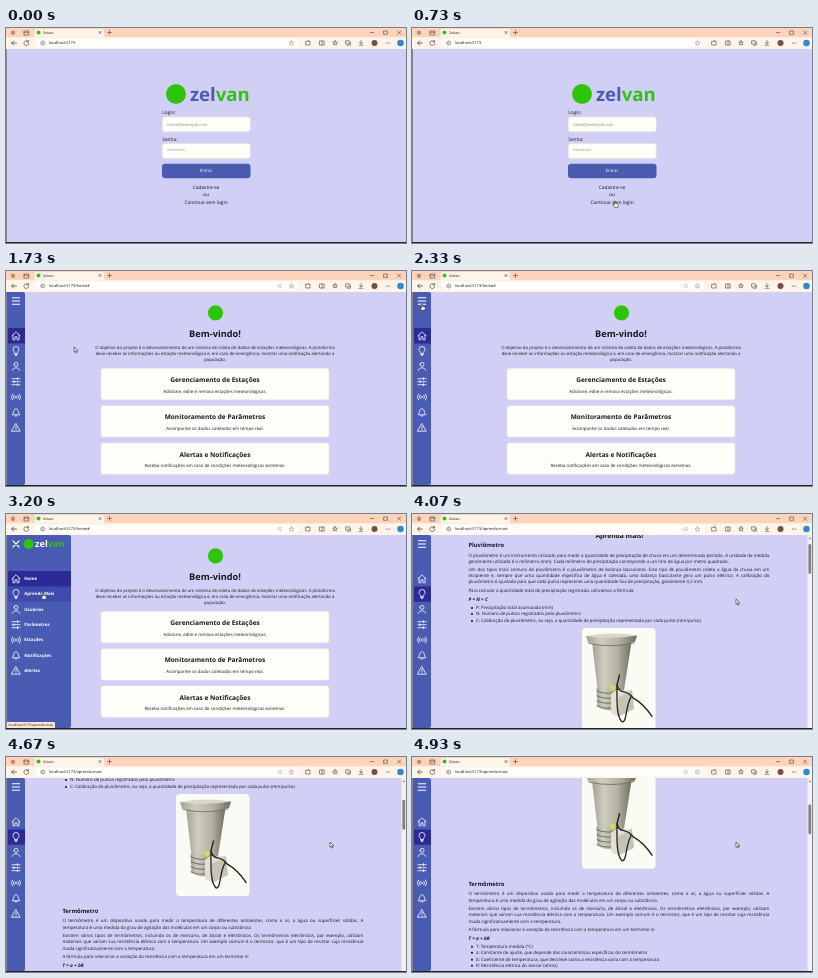
Recreate the animation shown at these times as an HTML page. Size 400x215 px, loop 4990 ms.

```html
<!DOCTYPE html>
<html lang="pt-BR">
<head>
<meta charset="utf-8">
<title>Zelvan</title>
<style>
html, body { margin: 0; width: 100%; height: 100%; overflow: hidden; }
#stage { position: relative; width: 400px; height: 215px; overflow: hidden; background: #d2cff6;
  font-family: "Open Sans", "Noto Sans", sans-serif; text-rendering: geometricPrecision; color: #17171c; }
#stage > *, #scroll, #scroll > * { position: absolute; }
svg { position: absolute; left: 0; top: 0; overflow: visible; }
#learn { inset: 0; }
#scroll { left: 0; top: 0; width: 396px; }
#scroll div { left: 56.4px; width: 301px; height: 6px; line-height: 6px; font-size: 4.45px; white-space: nowrap; }
#scroll .full { text-align-last: justify; }
#scroll .head { font-size: 5.8px; font-weight: 700; }
#scroll .eq { font-size: 4.75px; font-weight: 700; font-style: italic; }
#scroll .item { left: 64px; }
#scroll .item::before { content: ""; position: absolute; left: -5.2px; top: 2.2px; width: 1.8px; height: 1.8px; border-radius: 50%; background: #17171c; }
#scroll .title { left: 19px; width: 377px; text-align: center; font-size: 6.7px; font-weight: 700; }
#side { left: 1px; top: 21px; height: 193px; overflow: hidden; background: #4a5bb4; border-radius: 0 2px 2px 0; }
#side svg { left: -1px; top: -21px; }
</style>
</head>
<body>
<div id="stage">
  <svg id="login" width="400" height="215"></svg>
  <svg id="home" width="400" height="215"></svg>
  <div id="learn"><div id="scroll"></div><svg id="bar" width="400" height="215"></svg></div>
  <div id="side"><svg id="menu" width="400" height="215"></svg></div>
  <svg id="chrome" width="400" height="215"></svg>
  <svg id="cursor" width="20" height="20"></svg>
</div>
<script>
const LOOP = 4990, TICK = 1000 / 15;
const HOME_AT = 870, OPEN_AT = 2450, LEARN_AT = 3450;
const HOST = 'localhost:5173';
const INK = '#17171c', BLUE = '#4a5bb0', GREEN = '#2fc40c';
const $ = id => document.getElementById(id);

// SVG helpers; text is centred vertically on y
const text = (x, y, size, str, attrs = '') =>
  `<text x="${x}" y="${y + size * 0.3}" font-size="${size}" fill="${INK}" ${attrs}>${str}</text>`;
const mid = (x, y, size, str, attrs = '') => text(x, y, size, str, 'text-anchor="middle" ' + attrs);
const rect = (x, y, w, h, fill, r = 0, attrs = '') =>
  `<rect x="${x}" y="${y}" width="${w}" height="${h}" rx="${r}" fill="${fill}" ${attrs}/>`;
const dot = (x, y, r, fill) => `<circle cx="${x}" cy="${y}" r="${r}" fill="${fill}"/>`;
const line = (d, stroke, w = 0.7, attrs = '') =>
  `<path d="${d}" fill="none" stroke="${stroke}" stroke-width="${w}" stroke-linecap="round" stroke-linejoin="round" ${attrs}/>`;
const at = (x, y, body) => `<g transform="translate(${x} ${y})">${body}</g>`;
const BOLD = 'font-weight="700"';

function drawLogin() {
  const field = y => rect(156.3, y, 88, 14.8, '#fefefa', 2.5, 'stroke="#e6e5c4" stroke-width=".6"');
  const hint = 'style="fill:#85858c"';
  $('login').innerHTML =
    dot(170, 66, 10, GREEN) +
    text(184, 67, 18.6, `<tspan fill="${BLUE}">zel</tspan><tspan fill="${GREEN}">van</tspan>`, BOLD) +
    text(156.3, 85, 4.8, 'Login:') + field(89) + text(161, 96.6, 4.1, 'nome@exemplo.com', hint) +
    text(156.3, 112, 4.8, 'Senha:') + field(115.6) + text(161, 123.2, 4.1, '********', hint) +
    rect(156, 135.8, 88.5, 14.4, BLUE, 3) + mid(200, 143, 4.4, 'Entrar', 'style="fill:#fff"') +
    ['Cadastre-se', 'ou', 'Continue sem login'].map((s, i) => mid(200, 159.2 + i * 7.5, 4.8, s)).join('');
}

function drawHome() {
  const intro = [
    'O objetivo do projeto é o desenvolvimento de um sistema de coleta de dados de estações meteorológicas. A plataforma',
    'deve receber as informações ou estação meteorológica e, em caso de emergência, mostrar uma notificação alertando a',
    'população.'];
  const cards = [
    ['Gerenciamento de Estações', 'Adicione, edite e remova estações meteorológicas.'],
    ['Monitoramento de Parâmetros', 'Acompanhe os dados coletados em tempo real.'],
    ['Alertas e Notificações', 'Receba notificações em caso de condições meteorológicas extremas.']];
  $('home').innerHTML =
    dot(209.5, 41.8, 7.6, GREEN) + mid(209, 63, 9.2, 'Bem-vindo!', BOLD) +
    intro.map((s, i) => mid(209, 76.3 + i * 6, 4.3, s)).join('') +
    cards.map(([a, b], i) => at(0, i * 37.2,
      rect(95, 97.5, 228, 31.3, '#fefefb', 2.5, 'stroke="#ecebd2" stroke-width=".6"') +
      mid(209, 109.3, 6.5, a, BOLD) + mid(209, 120.2, 4.42, b))).join('');
}

function gauge() {
  return `<linearGradient id="metal"><stop offset="0" stop-color="#a3a192"/><stop offset=".3" stop-color="#cfcdbf"/>
      <stop offset=".65" stop-color="#b3b1a2"/><stop offset="1" stop-color="#6f6d60"/></linearGradient>` +
    rect(170, 114, 73.5, 102, '#fbfbf5', 4) +
    `<path d="M180 128 L185.5 176 Q197 181 212 176 L219.5 128Z" fill="url(#metal)"/>
     <path d="M174 122 L176 128.5 Q200 134 223 128 L225 121.5Z" fill="url(#metal)"/>
     <path d="M174 122 Q200 117.5 225 121.5 Q200 126 174 122Z" fill="#dad8ca"/>
     <path d="M184.5 174 H207 V194 Q194 200 185.5 192Z" fill="url(#metal)"/>` +
    line('M177 129.5 Q200 134.5 222 129', '#77756a', 0.9) +
    [177, 182, 187, 192].map(y => line(`M185 ${y} Q194 ${y + 4} 204 ${y + 1.5}`, '#6f6d61', 1)).join('') +
    `<path d="M199 180 L204 176 L220 176 L222 195 L206 203 L199 199Z" fill="#e2e0d3"/>
     <path d="M206 184 L220 176 L222 195 L206 203Z" fill="#c6c4b6"/>` +
    dot(201, 174, 2.7, '#d2dc5c') +
    line('M207.5 161 L205 171 C208 182 214 174 221 184 C230 189 235 195 240 202.5', '#22231f', 1.4) +
    line('M205 171 C205 185 204 202 210 208 C215 209 213 194 219 183', '#22231f', 1.3);
}

function drawLearn() {
  // [y, class, text]
  const rows = [
    [21.7, 'title', 'Aprenda mais!'],
    [31, 'head', 'Pluviômetro'],
    [41.5, 'full', 'O pluviômetro é um instrumento utilizado para medir a quantidade de precipitação de chuva em um determinado período. A unidade da medida'],
    [48, '', 'geralmente utilizada é o milímetro (mm). Cada milímetro de precipitação corresponde a um litro de água por metro quadrado.'],
    [55.6, 'full', 'Um dos tipos mais comuns de pluviômetro é o pluviômetro de balança basculante. Este tipo de pluviômetro coleta a água da chuva em um'],
    [61.8, 'full', 'recipiente e, sempre que uma quantidade específica de água é coletada, uma balança basculante gera um pulso elétrico. A calibração do'],
    [68, '', 'pluviômetro é ajustada para que cada pulso represente uma quantidade fixa de precipitação, geralmente 0,2 mm.'],
    [76.4, '', 'Para calcular a quantidade total de precipitação registrada, utilizamos a fórmula:'],
    [85.5, 'eq', 'P = N × C'],
    [93.6, 'item', 'P: Precipitação total acumulada (mm)'],
    [100.1, 'item', 'N: Número de pulsos registrados pelo pluviômetro'],
    [106.7, 'item', 'C: Calibração do pluviômetro, ou seja, a quantidade de precipitação representada por cada pulso (mm/pulso)'],
    [230.4, 'head', 'Termômetro'],
    [241, 'full', 'O termômetro é um dispositivo usado para medir a temperatura de diferentes ambientes, como o ar, a água ou superfícies sólidas. A'],
    [247.4, '', 'temperatura é uma medida do grau de agitação das moléculas em um corpo ou substância.'],
    [255.6, 'full', 'Existem vários tipos de termômetros, incluindo os de mercúrio, de álcool e eletrônicos. Os termômetros eletrônicos, por exemplo, utilizam'],
    [262, 'full', 'materiais que variam sua resistência elétrica com a temperatura. Um exemplo comum é o termistor, que é um tipo de resistor cuja resistência'],
    [268.3, '', 'muda significativamente com a temperatura.'],
    [277, '', 'A fórmula para relacionar a variação da resistência com a temperatura em um termistor é:'],
    [285.4, 'eq', 'T = a + bR'],
    [293.6, 'item', 'T: Temperatura medida (°C)'],
    [300.1, 'item', 'a: Constante de ajuste, que depende das características específicas do termômetro'],
    [306.6, 'item', 'b: Coeficiente de temperatura, que descreve como a resistência varia com a temperatura'],
    [313.1, 'item', 'R: Resistência elétrica do sensor (ohms)']];
  $('scroll').innerHTML = `<svg width="396" height="330">${gauge()}</svg>` +
    rows.map(([y, c, s]) => `<div class="${c}" style="top:${y - 2.8}px">${s}</div>`).join('');
  $('bar').innerHTML = rect(395.5, 21, 4.5, 193, '#f6f0ee') +
    '<path d="M396.6 25 L397.8 23.2 L399 25Z" fill="#77726c"/>' +
    rect(396.4, 0, 2.8, 30, '#85807c', 1.4, 'id="thumb"');
}

// Menu glyphs, each centred on 0,0
const GLYPHS = [
  'M-4 0 L0 -4 L4 0 M-3 -1 V4 H-1 V1 H1 V4 H3 V-1',
  'M-1.4 2 C-1.4 .5 -3 0 -3 -1.6 A3 3 0 0 1 3 -1.6 C3 0 1.4 .5 1.4 2Z M-1.2 3.3 H1.2 M-.6 4.4 H.6',
  'M-2 -2 A2 2 0 1 0 2 -2 A2 2 0 1 0 -2 -2 M-3.7 4 C-3.7 .5 3.7 .5 3.7 4',
  'M-4 -3 H4 M-4 0 H4 M-4 3 H4 M1.5 -4 V-2 M-2 -1 V1 M1.5 2 V4',
  'M-.6 0 A.6 .6 0 1 0 .6 0 A.6 .6 0 1 0 -.6 0 M-1.8 -1.8 A2.5 2.5 0 0 0 -1.8 1.8 M1.8 -1.8 A2.5 2.5 0 0 1 1.8 1.8 M-3.3 -3.1 A4.5 4.5 0 0 0 -3.3 3.1 M3.3 -3.1 A4.5 4.5 0 0 1 3.3 3.1',
  'M-3.5 2.2 C-2 .8 -2.7 -3.6 0 -3.6 C2.7 -3.6 2 .8 3.5 2.2Z M-1 3.6 H1',
  'M0 -3.8 L4.2 3.6 H-4.2Z M0 -1.2 V1.2 M0 2.3 V2.4'];
const LABELS = ['Home', 'Aprenda Mais', 'Usuários', 'Parâmetros', 'Estações', 'Notificações', 'Alertas'];
const rowY = i => 64.8 + i * 15.3;

function drawMenu() {
  const white = 'style="fill:#fff"';
  $('menu').innerHTML =
    rect(2, 0, 64, 15.4, '#3f4cae', 1, 'id="hover"') +
    rect(2, 0, 64, 15.4, '#2b2a96', 1, 'id="active"') +
    line('M6.3 26.8 H13.7 M6.3 30 H13.7 M6.3 33.2 H13.7', '#fff', 1.1, 'id="burger"') +
    `<g id="opened">${line('M7 27 L13 33 M13 27 L7 33', '#fff', 1.1)}${dot(22.5, 30, 5, GREEN)}` +
    text(29, 30.3, 9.2, `<tspan fill="#fff">zel</tspan><tspan fill="${GREEN}">van</tspan>`, BOLD) +
    LABELS.map((s, i) => text(18.2, rowY(i), 4.4, s, `${BOLD} ${white}`)).join('') + '</g>' +
    GLYPHS.map((d, i) => at(10, rowY(i), line(d, '#fff', 0.8))).join('');
}

function drawChrome() {
  const c = '#4b433d';
  $('chrome').innerHTML =
    rect(0, 0, 400, 10, '#fdd3bb') + rect(0, 9.2, 400, 11.8, '#fff4ea') +
    '<path d="M27 9.5 Q28.5 9 28.5 7 V3 Q28.5 1 30.5 1 H96 Q98 1 98 3 V7 Q98 9 99.5 9.5Z" fill="#fff4ea"/>' +
    dot(7, 4.8, 2.2, '#b98e72') +
    line('M18.3 3 H22.7 V7 H18.3Z M18.3 4.3 H22.7', c, 0.6) +
    dot(32.5, 4.6, 2, GREEN) + text(37, 4.5, 3.5, 'Zelvan') +
    line('M92.8 3.3 L95.2 5.7 M95.2 3.3 L92.8 5.7 M101.6 4.5 H105.4 M103.5 2.6 V6.4', c, 0.6) +
    line('M364.5 4.6 H368 M378 3 H381.4 V6.3 H378Z M391.5 3 L394.8 6.3 M394.8 3 L391.5 6.3', c, 0.6) +
    line('M10.3 15 H5.8 M7.6 13 L5.6 15 L7.6 17', c, 0.8) +
    line('M22.2 13.6 A2.4 2.4 0 1 0 22.7 15.5 M22.4 12.4 V13.9 H20.9', c, 0.7) +
    rect(29.5, 10.6, 263, 8.8, '#fffefb', 4.4) +
    line('M34.8 15 A2 2 0 1 1 38.8 15 A2 2 0 1 1 34.8 15 M36.8 14.8 V16 M36.8 13.9 V14', c, 0.5) +
    text(43, 15, 3.9, HOST, 'id="url"') +
    line('M272 16.5 L275.5 13 M272.2 14.2 L273.4 13 M274.2 16.8 L275.6 15.4', '#8d8680', 0.6, 'id="link"') +
    line('M285.5 12.7 L286.2 14.3 L288 14.5 L286.7 15.6 L287.1 17.3 L285.5 16.4 L283.9 17.3 L284.3 15.6 L283 14.5 L284.8 14.3Z', '#8d8680', 0.5) +
    at(302, 15, line('M-2 -1.6 H0 V-2.4 H1 V-1.6 H2 V2 H-2Z', c, 0.6)) +
    at(316, 15, line('M-2.2 -2 H2.2 V2 H-2.2Z M0 -2 V2', c, 0.6)) +
    at(329, 15, line('M0 -2.4 L.7 -.8 H2.4 L1 .3 L1.5 2 L0 1 L-1.5 2 L-1 .3 L-2.4 -.8 H-.7Z', c, 0.6)) +
    at(342, 15, line('M-2 -2.2 H1.2 V1 H-2Z M-.8 2.2 H2.4 V-1', c, 0.6)) +
    at(355, 15, line('M0 -2.4 V1 M-1.5 -.5 L0 1 L1.5 -.5 M-2 2.3 H2', c, 0.6)) +
    dot(368.5, 15, 3, '#76503b') +
    [380.3, 382, 383.7].map(x => dot(x, 15, 0.5, c)).join('') + dot(394.5, 15, 3.3, '#3088cf') +
    `<g id="status">${rect(0, 208, 49, 6.4, '#fbe6d4', 1)}${text(2.5, 211.2, 3.3, HOST + '/aprenda-mais')}</g>` +
    rect(0, 21, 0.6, 194, '#55505a') + rect(0, 214, 400, 1, '#25221f');
}

function drawCursor() {
  const style = 'fill="#fff" stroke="#222" stroke-width=".6" stroke-linejoin="round"';
  $('cursor').innerHTML =
    `<path id="arrow" d="M0 0 V5.3 L1.3 4.2 L2.1 6.1 L3 5.7 L2.2 3.9 H3.8Z" ${style}/>
     <path id="hand" d="M-.6 .3 Q0 -.4 .6 .3 V2.4 L3 3 Q3.4 3.2 3.3 4.2 L2.8 6.3 H-.4 L-2 4 Q-1.8 3.2 -.6 4Z" ${style}/>`;
}

// Interpolates rows of [time, ...values]
const smooth = k => k * k * (3 - 2 * k);
function track(keys, t, ease = k => k) {
  const i = keys.findIndex(k => k[0] > t);
  if (i < 0) return keys.at(-1).slice(1);
  if (i === 0) return keys[0].slice(1);
  const a = keys[i - 1], b = keys[i], k = ease((t - a[0]) / (b[0] - a[0]));
  return a.slice(1).map((v, j) => v + (b[j + 1] - v) * k);
}
const POINTER = [[0, 300, 225], [470, 212, 178], [600, 203, 173], [930, 203, 173], [1400, 113, 109],
  [2130, 10, 33], [2500, 10, 33], [3000, 37, 79], [3450, 37, 79], [3950, 324, 85]];
const SCROLL = [[3930, -14], [4066, 0], [4666, 77], [4930, 104], [4990, 109]];
const WIDTH = [[OPEN_AT, 18], [OPEN_AT + 280, 64], [LEARN_AT, 64], [LEARN_AT + 200, 18]];

const show = (id, on) => { $(id).style.display = on ? '' : 'none'; };
const within = (t, a, b) => t >= a && t < b;

function render(t) {
  const learn = t >= LEARN_AT, home = within(t, HOME_AT, LEARN_AT);
  const hover = within(t, 2940, LEARN_AT);
  show('login', t < HOME_AT);
  show('home', home);
  show('learn', learn);
  show('side', t >= HOME_AT);
  show('link', t >= HOME_AT);
  $('url').textContent = HOST + (learn ? '/aprenda-mais' : home ? '/home#' : '');

  const [width] = track(WIDTH, t, smooth);
  $('side').style.width = width + 'px';
  show('opened', width > 18);
  show('burger', width <= 18);
  show('hover', hover);
  show('status', hover);
  $('hover').setAttribute('y', rowY(1) - 7.7);
  $('active').setAttribute('y', rowY(learn ? 1 : 0) - 7.7);

  const [scroll] = track(SCROLL, t);
  $('scroll').style.transform = `translateY(${-scroll}px)`;
  $('thumb').setAttribute('y', 30 + scroll / 6);

  const [x, y] = track(POINTER, t, smooth);
  const hand = within(t, 540, HOME_AT) || within(t, 2060, 2560) || hover;
  $('cursor').style.transform = `translate(${x}px, ${y}px)`;
  show('hand', hand);
  show('arrow', !hand);
}

[drawLogin, drawHome, drawLearn, drawMenu, drawChrome, drawCursor].forEach(draw => draw());
const start = performance.now();
function loop() {
  const t = Math.max(0, performance.now() - start) % LOOP;
  render(Math.floor((t + 4) / TICK) * TICK);
  requestAnimationFrame(loop);
}
loop();
</script>
</body>
</html>
```
